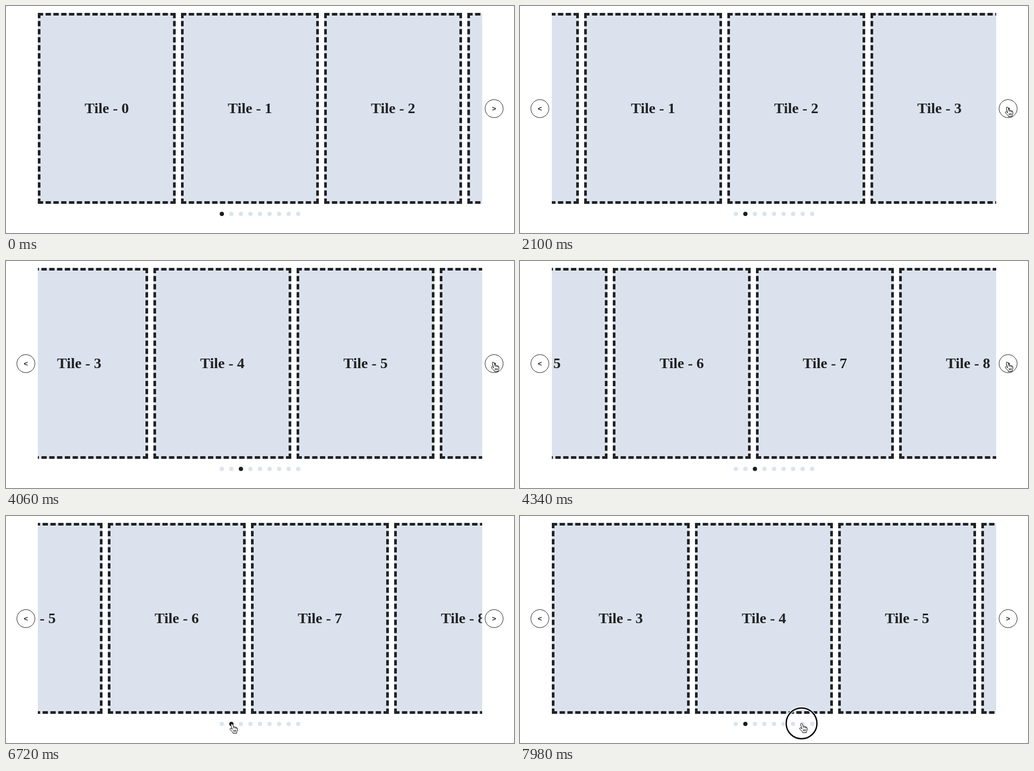
Recreate the animation shown at these times as an HTML page. Size 958 by 428 pixels, loop 8 s.

```html
<!DOCTYPE html>
<html lang="en">
<head>
<meta charset="utf-8">
<title>Tile carousel</title>
<style>
  html, body { margin: 0; width: 100%; height: 100%; overflow: hidden; background: #e4e4e4; }
  #stage { position: absolute; left: 0; top: 0; width: 958px; height: 428px; overflow: hidden; background: #fff; border-radius: 3px; }
  #view { position: absolute; left: 60px; top: 13px; width: 838px; height: 360px; overflow: hidden; }
  #track { display: flex; gap: 10px; width: max-content; }
  .tile {
    box-sizing: border-box; width: 260px; height: 360px;
    display: flex; align-items: center; justify-content: center;
    border: 5px dashed #202223; background: #dce2ed; color: #202223;
    font: bold 28px "Liberation Serif", "Times New Roman", serif;
  }
  .nav {
    position: absolute; top: 176px; box-sizing: border-box; width: 35px; height: 35px;
    display: flex; align-items: center; justify-content: center;
    border: 1px solid #202223; border-radius: 50%; background: #fff; color: #202223;
    font: bold 13.33px "Liberation Sans", Arial, sans-serif;
  }
  .dot { position: absolute; top: 388px; width: 8px; height: 8px; border-radius: 50%; background: #dae4ee; }
  .dot.on { background: #1b1d1f; }
  svg { position: absolute; left: 0; top: 0; }
</style>
</head>
<body>
<div id="stage">
  <div id="view"><div id="track"></div></div>
  <div class="nav" id="prev" style="left:20px">&lt;</div>
  <div class="nav" style="left:903px">&gt;</div>
  <div id="dots"></div>
  <svg width="958" height="428" fill="none" stroke-linejoin="round" stroke-linecap="round">
    <g id="cursor">
      <g id="ring">
        <circle r="29" stroke="#fff" stroke-width="5"/>
        <circle r="29" stroke="#000" stroke-width="2.5"/>
      </g>
      <path id="arrow" d="M.8 1V14.6L3.9 11.7L6.4 17L8.6 16L6.2 10.8H10.2Z" fill="#000" stroke="#fff"/>
      <g id="hand" stroke="#000">
        <path d="M.6 10L-1.8 2.6Q-2.2 .2 -.6 0T1.6 1.4L3 5.6Q5 4.6 5.8 6.2Q7.8 5.4 8.3 7Q10.2 6.8 10.4 9V12Q10 14.6 9 16V17.6H2V16.2Q-1 13.4 -3.4 10.6Q-4.4 9 -3 8.4T.6 10Z" fill="#fff"/>
        <path d="M3 5.6L3.6 8M5.8 6.2L6.2 8.4M8.3 7V9M3.4 11.5V14.6M5.4 11.5V14.6M7.4 11.5V14.6" stroke-width=".9"/>
      </g>
    </g>
  </svg>
</div>
<script>
const LOOP = 8000, STEP = 70, PAGE = 810, SLIDE_MS = 500;
const $ = id => document.getElementById(id);

function add(parent, className, text = "") {
  const el = document.createElement("div");
  el.className = className;
  el.textContent = text;
  return parent.appendChild(el);
}

for (let i = 0; i < 27; i++) add($("track"), "tile", "Tile - " + i);

const dotX = i => 407 + 18 * i;
const dots = Array.from({ length: 9 }, (_, i) => {
  const dot = add($("dots"), "dot");
  dot.style.left = dotX(i) - 4 + "px";
  return dot;
});

const clicks = [
  { press: 1820, slide: 1924, page: 1 },
  { press: 3780, slide: 3971, page: 2 },
  { press: 6440, slide: 6580, page: 1 },
  { press: 7980, slide: LOOP, page: 7 }
];

// Pointer trips, each starting where the last one ended
const entry = { x: 975, y: 300 };
const trips = [
  { start: 0, end: 770, x: 441, y: 404 },
  { start: 840, end: 1680, x: 919, y: 191 },
  { start: 4690, end: 5460, x: 435, y: 364 },
  { start: 5460, end: 5670, x: 428, y: 404 },
  { start: 5670, end: 6300, x: 426, y: 392 },
  { start: 7080, end: 7840, x: 531, y: 391 }
];

const mix = (a, b, k) => a + (b - a) * k;

// cubic-bezier(.42, 0, .58, 1)
function easeInOut(x) {
  if (x <= 0) return 0;
  if (x >= 1) return 1;
  let lo = 0, hi = 1, s;
  for (let i = 0; i < 24; i++) {
    s = (lo + hi) / 2;
    const bx = 1.26 * s * (1 - s) ** 2 + 1.74 * s * s * (1 - s) + s ** 3;
    if (bx < x) lo = s; else hi = s;
  }
  return s * s * (3 - 2 * s);
}

function pointerAt(t) {
  let { x, y } = entry;
  for (const trip of trips) {
    const k = easeInOut((t - trip.start) / (trip.end - trip.start));
    x = mix(x, trip.x, k);
    y = mix(y, trip.y, k);
  }
  return { x, y };
}

const show = (id, on) => { $(id).style.display = on ? "" : "none"; };

function draw(t) {
  let page = 0, pos = 0;
  for (const c of clicks) {
    if (t < c.slide) break;
    page = c.page;
    pos = mix(pos, page, easeInOut((t - c.slide) / SLIDE_MS));
  }
  $("track").style.transform = `translateX(${-Math.round(pos * PAGE)}px)`;
  dots.forEach((dot, i) => dot.classList.toggle("on", i === page));
  show("prev", page > 0);

  const { x, y } = pointerAt(t);
  const near = (cx, cy, r) => Math.hypot(x - cx, y - cy) < r;
  const over = near(920.5, 193.5, 17.5) || dots.some((_, i) => near(dotX(i), 392, 4.5));
  $("cursor").setAttribute("transform", `translate(${x} ${y})`);
  show("hand", over);
  show("arrow", !over);
  show("ring", clicks.some(c => t >= c.press && t < c.press + 2 * STEP));
}

function tick() {
  const t = performance.now() % LOOP;
  draw(Math.floor(t / STEP) * STEP);
  requestAnimationFrame(tick);
}
tick();
</script>
</body>
</html>
```
